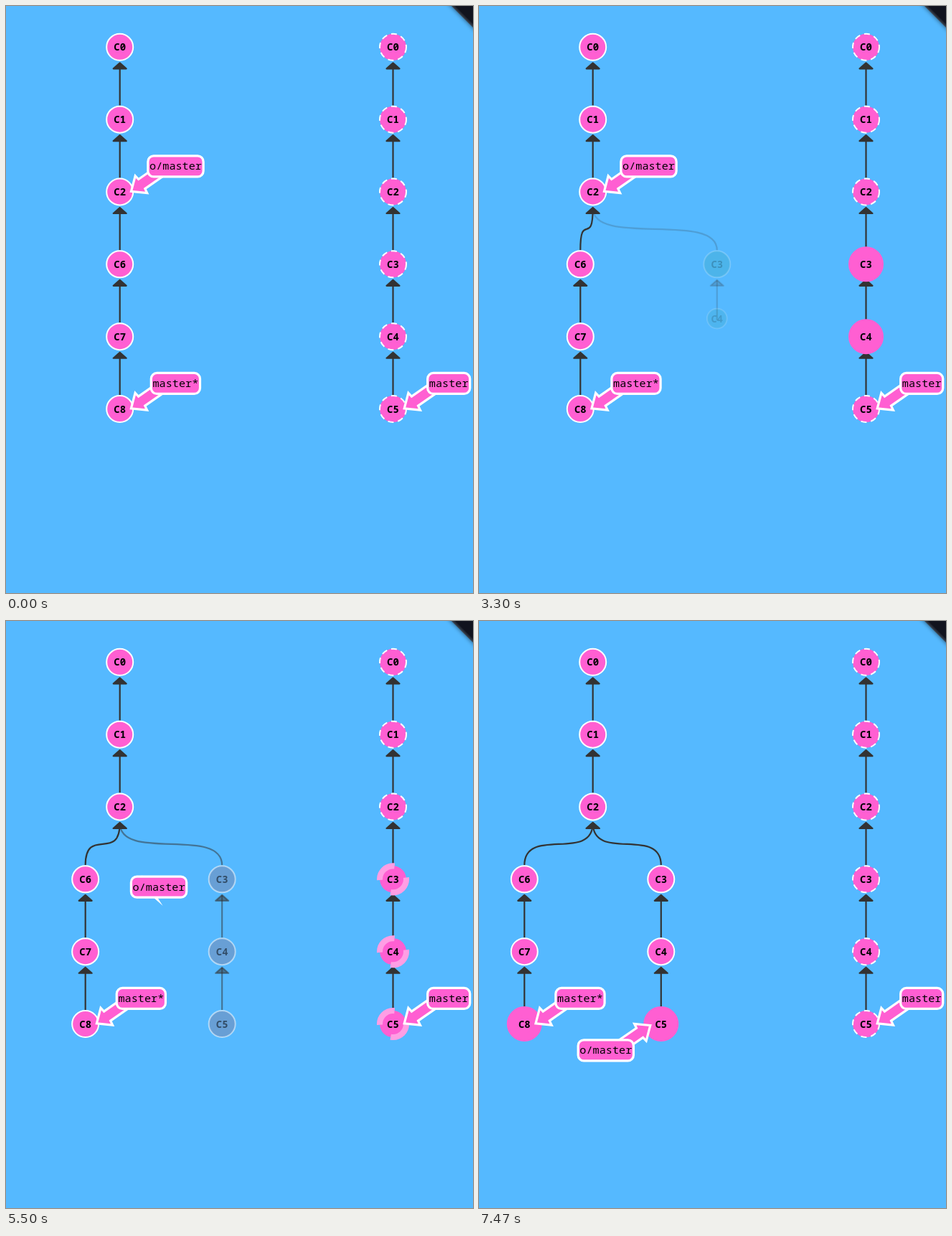
These frames come from a looping animation (651 by 818 pixels, 8000 ms). An HTML page with a canvas:

```html
<!DOCTYPE html>
<html lang="en">
<head>
<meta charset="utf-8">
<title>Fetch onto a diverged branch</title>
<style>
  html, body { margin: 0; height: 100%; overflow: hidden; background: #55b9ff; }
  canvas { display: block; }
</style>
</head>
<body>
<canvas id="stage" width="651" height="818"></canvas>
<script>
const ctx = document.getElementById('stage').getContext('2d');
const LOOP = 8000, SKY = '#55b9ff', INK = '#333';
const PINK = [255, 95, 210], TEAL = [40, 160, 150], WHITE = [255, 255, 255];
const FONT = '"Noto Sans Mono", "DejaVu Sans Mono", monospace';
const R = 18.5, LOCAL = 158.7, REMOTE = 539.5;

const rowY = i => 57.3 + 100.85 * i;
const lerp = (a, b, k) => a + (b - a) * k;
const mix = (a, b, k) => `rgb(${a.map((v, i) => Math.round(lerp(v, b[i], k)))})`;
const span = (t, start, length) => Math.min(1, Math.max(0, (t - start) / length));

// cubic-bezier(.42, 0, .58, 1)
function ease(x) {
  let s = x;
  for (let i = 0; i < 5; i++) {
    s -= (1.26 * s - 0.78 * s * s + 0.52 * s ** 3 - x) / (1.26 - 1.56 * s + 1.56 * s * s);
  }
  return s * s * (3 - 2 * s);
}

function bounce(x) {
  const k = 7.5625, p = 2.75;
  if (x < 1 / p) return k * x * x;
  if (x < 2 / p) return k * (x - 1.5 / p) ** 2 + 0.75;
  if (x < 2.5 / p) return k * (x - 2.25 / p) ** 2 + 0.9375;
  return k * (x - 2.625 / p) ** 2 + 0.984375;
}

function text(str, x, y, font) {
  ctx.font = `${font} ${FONT}`;
  ctx.textAlign = 'center';
  ctx.textBaseline = 'alphabetic';
  ctx.fillStyle = '#000';
  ctx.fillText(str, x, y);
}

function edge(x, y, px, py, alpha = 1) {
  const tail = y - 19.5, head = py + 22.5;
  ctx.globalAlpha = alpha;
  ctx.strokeStyle = ctx.fillStyle = INK;
  ctx.lineWidth = 2.2;
  ctx.lineJoin = 'round';
  ctx.beginPath();
  ctx.moveTo(x, tail);
  if (x === px) ctx.lineTo(px, head);
  else ctx.bezierCurveTo(x, tail - 55, px, head + 55, px, head);
  ctx.stroke();
  ctx.beginPath();
  ctx.moveTo(px, py + 22);
  ctx.lineTo(px + 9, py + 30);
  ctx.lineTo(px - 9, py + 30);
  ctx.closePath();
  ctx.fill();
  ctx.stroke();
  ctx.globalAlpha = 1;
}

function node(name, x, y, { glow = 0, dashed = false, alpha = 1, r = R, fill = mix(PINK, PINK, 0) } = {}) {
  const width = 2 + 10 * glow;
  ctx.globalAlpha = alpha;
  ctx.beginPath();
  ctx.arc(x, y, r, 0, 2 * Math.PI);
  ctx.fillStyle = fill;
  ctx.fill();
  ctx.strokeStyle = mix(WHITE, PINK, glow);
  ctx.lineWidth = width;
  ctx.setLineDash(dashed ? [4 * width, 3 * width] : []);
  ctx.stroke();
  ctx.setLineDash([]);
  text(name, x, y + 5, '600 14px');
  ctx.globalAlpha = 1;
}

// side runs from 1 (label up and right of the tip) to -1 (down and left)
function branch(name, tipX, tipY, side = 1) {
  const ux = 0.82 * side, uy = -0.57 * side, nx = 0.57, ny = 0.82;
  const outline = [[0, 0], [17, -14.5], [18, -8], [58, -8], [58, 8], [18, 8], [17, 14.5]];
  ctx.beginPath();
  for (const [a, b] of outline) ctx.lineTo(tipX + a * ux + b * nx, tipY + a * uy + b * ny);
  ctx.closePath();
  ctx.fillStyle = mix(PINK, PINK, 0);
  ctx.strokeStyle = '#fff';
  ctx.lineWidth = 3.2;
  ctx.lineJoin = 'miter';
  ctx.fill();
  ctx.stroke();

  const x = tipX + 62 * side, y = tipY - 34.9 * side, w = 9.1 * name.length + 4.5;
  ctx.beginPath();
  ctx.roundRect(x - w / 2, y - 14.5, w, 29, 8);
  ctx.fill();
  ctx.stroke();
  text(name, x, y + 5, '500 15.2px');
}

function corner() {
  const shade = ctx.createLinearGradient(621, 0, 624, -3);
  shade.addColorStop(0, '#3c4652');
  shade.addColorStop(1, '#11131e');
  ctx.save();
  ctx.shadowColor = 'rgba(0, 0, 0, .6)';
  ctx.shadowBlur = 6;
  ctx.fillStyle = shade;
  ctx.beginPath();
  ctx.moveTo(613, -8);
  ctx.lineTo(670, -8);
  ctx.lineTo(670, 49);
  ctx.fill();
  ctx.restore();
}

function draw(t) {
  ctx.fillStyle = SKY;
  ctx.fillRect(0, 0, 651, 818);
  corner();

  const glowAt = start => ease(span(t, start, 500));
  const settle = ease(span(t, 5289, 485));
  const split = ease(span(t, 1116, 614));
  const oldX = LOCAL - 17.4 * split - 78 * settle;
  const newX = 331.8 - 78 * settle;

  // commits copied from the remote, one after another
  const births = [1235, 2885, 4478];
  const fresh = births.map((start, i) => {
    const fromX = i ? newX : LOCAL, y0 = rowY(2 + i), y1 = rowY(3 + i);
    const grow = bounce(span(t, start, 750)), slide = ease(span(t, start - 119, 614));
    return {
      name: 'C' + (3 + i), grow, slide, px: fromX, py: y0,
      x: lerp(fromX, newX, grow), y: lerp(y0, y1, grow),
      edgeX: lerp(fromX, newX, slide), edgeY: lerp(y0, y1, slide)
    };
  });
  const visible = k => k * lerp(0.2, 1, settle);

  for (let i = 1; i < 6; i++) {
    edge(REMOTE, rowY(i), REMOTE, rowY(i - 1));
    const x = i < 3 ? LOCAL : oldX;
    edge(x, rowY(i), i < 4 ? LOCAL : oldX, rowY(i - 1));
  }
  for (const c of fresh) {
    if (c.slide > 0) edge(c.edgeX, c.edgeY, c.px, c.py, visible(c.slide));
  }

  const pulses = [350, 2000, 3620];
  for (let i = 0; i < 6; i++) {
    const glow = i < 3 ? 0 : glowAt(pulses[i - 3]) * (1 - settle);
    node('C' + i, REMOTE, rowY(i), { glow, dashed: glow === 0 || settle > 0 });
    if (i < 3) node('C' + i, LOCAL, rowY(i));
    else node('C' + (i + 3), oldX, rowY(i), { glow: i === 5 ? glowAt(6950) : 0 });
  }
  fresh.forEach((c, i) => {
    if (c.grow > 0) node(c.name, c.x, c.y, {
      r: R * c.grow, alpha: visible(c.grow), fill: mix(TEAL, PINK, settle),
      glow: i === 2 ? glowAt(6110) : 0
    });
  });

  branch('master', REMOTE + 15.7, rowY(5) - 0.7);
  branch('master*', oldX + 15.7, rowY(5) - 0.7);
  branch('o/master', lerp(174.5, 238.8, settle), lerp(258.3, 563.5, settle), 1 - 2 * settle);
}

function tick(now) {
  draw(now % LOOP);
  requestAnimationFrame(tick);
}
draw(0);
requestAnimationFrame(tick);
</script>
</body>
</html>
```
